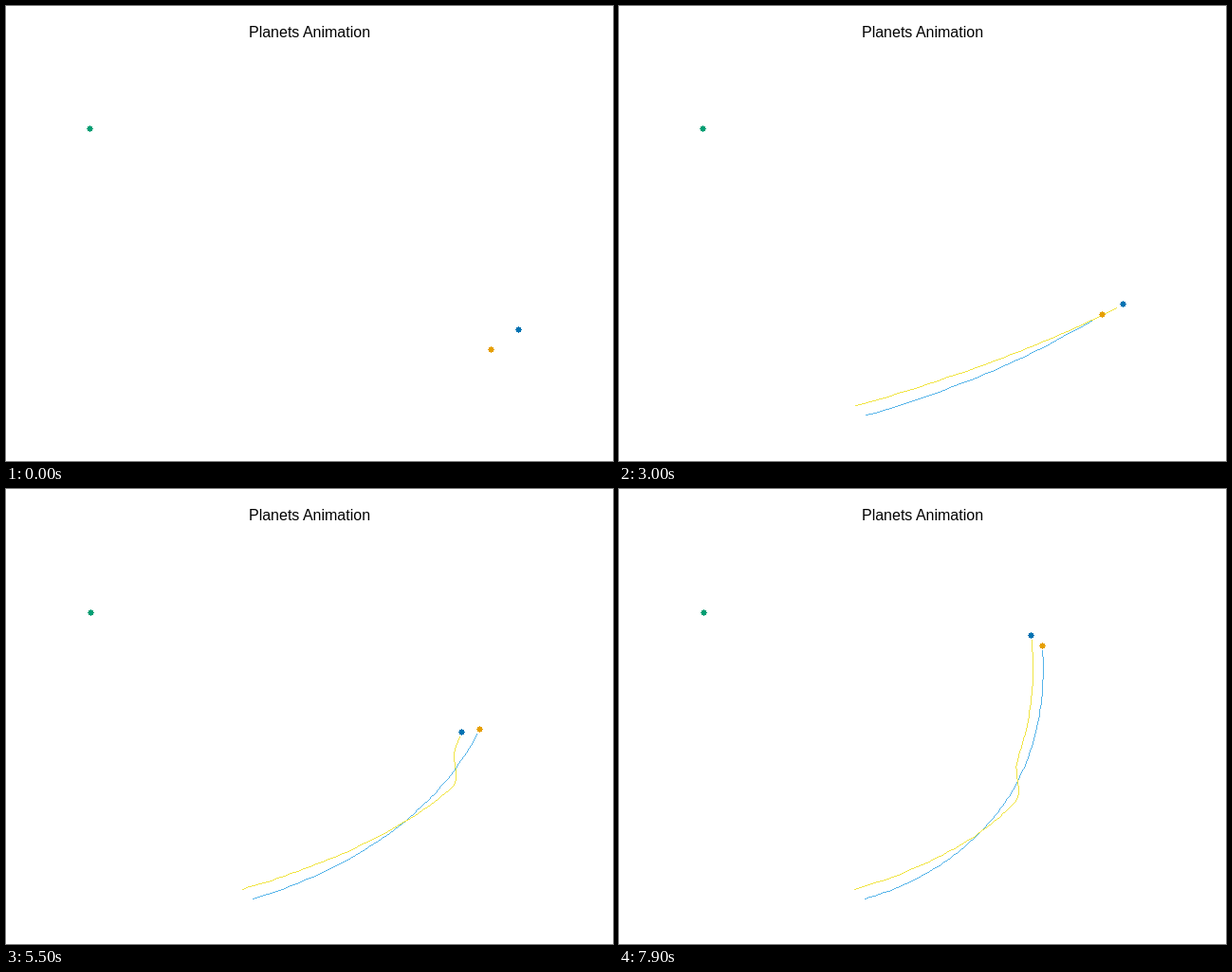
Write an HTML page with a canvas that moves like this. It is 640 px wide and 480 px high and loops after 8 s.

```html
<!DOCTYPE html>
<html lang="en">
<head>
<meta charset="utf-8">
<title>Planets Animation</title>
<style>
  html, body { margin: 0; width: 640px; height: 480px; overflow: hidden; background: #fff; }
  canvas { display: block; }
  h1 {
    position: absolute; top: 19px; left: 0; width: 640px; margin: 0; text-align: center;
    font: 16px/18px "Liberation Sans", Arial, sans-serif; color: #000;
  }
</style>
</head>
<body>
<canvas id="stage" width="640" height="480"></canvas>
<h1>Planets Animation</h1>
<script>
const ctx = document.getElementById("stage").getContext("2d");
const STEPS = 80, STEP_MS = 100;
// Screen vector of the depth axis, which rescales to the farthest planet
const AXIS_X = 293, AXIS_Y = -81;

const smoothstep = u => {
  u = Math.min(Math.max(u, 0), 1);
  return u * u * (3 - 2 * u);
};

// Sideways push the blue planet keeps after its close encounter
const push = s => Math.max(s - 42, 0) ** 1.2;

// Each planet: depth and screen position (without depth) at step s
const blue = {
  depth: s => 0.2 + s - 0.0059 * s * s - 4.4 * smoothstep((s - 39) / 15),
  x: s => 247 - 15 * (s / 40) ** 1.85 + 0.14 * push(s),
  y: s => 422 - 42 * (s / 40) ** 1.8 - 0.74 * push(s)
};
const orange = {
  depth: s => 0.2 + 0.835 * s - 0.0029 * s * s,
  x: s => 258 - 105 * (s / 80) ** 1.95,
  y: s => 432 - 186 * (s / 80) ** 1.81
};

// Where a planet's step s appears when the latest step is now
function place(planet, s, now) {
  const r = planet.depth(s) / Math.max(blue.depth(now), orange.depth(now));
  return [Math.round(planet.x(s) + AXIS_X * r), Math.round(planet.y(s) + AXIS_Y * r)];
}

// One-pixel line without smoothing
function line([x0, y0], [x1, y1]) {
  const n = Math.max(Math.abs(x1 - x0), Math.abs(y1 - y0), 1);
  for (let i = 0; i <= n; i++) {
    const u = i / n;
    ctx.fillRect(Math.round(x0 + (x1 - x0) * u), Math.round(y0 + (y1 - y0) * u), 1, 1);
  }
}

function trail(planet, n, color) {
  ctx.fillStyle = color;
  for (let s = 1; s <= n; s++) line(place(planet, s - 1, n + 1), place(planet, s, n + 1));
}

function dot([x, y], color) {
  ctx.fillStyle = color;
  ctx.fillRect(x - 2, y - 2, 5, 5);
  ctx.fillRect(x - 3, y, 7, 1);
  ctx.fillRect(x, y - 3, 1, 7);
}

function draw(n) {
  const now = n + 1;
  ctx.fillStyle = "#fff";
  ctx.fillRect(0, 0, 640, 480);
  trail(orange, n, "#56b4e9");
  trail(blue, n, "#f0e442");
  dot(place(blue, now, now), "#0072b2");
  dot(place(orange, now, now), "#e69f00");
  dot([Math.round(88 + n / 102), Math.round(129 + n / 66)], "#009e73");
}

const start = performance.now();
function tick() {
  draw(Math.floor(Math.max(performance.now() - start, 0) / STEP_MS) % STEPS);
  requestAnimationFrame(tick);
}
tick();
</script>
</body>
</html>
```
